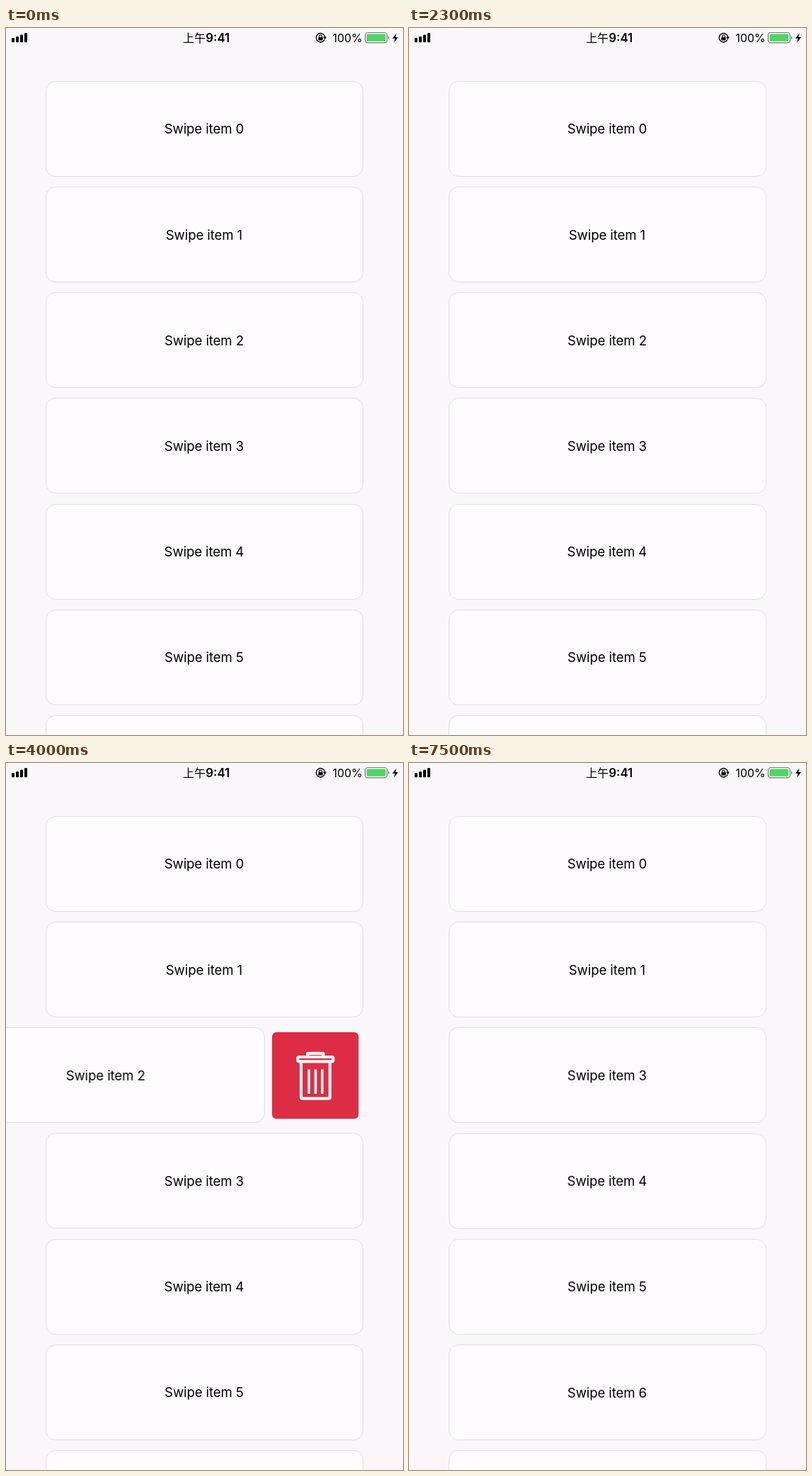
An HTML page that plays this animation: 561x998 px, repeating every 8100 ms.

```html
<!DOCTYPE html>
<html lang="en">
<head>
<meta charset="utf-8">
<title>Swipe list</title>
<style>
  html, body { margin: 0; width: 100%; height: 100%; overflow: hidden; background: #f9f7f9; }
  body { position: relative; font-family: Inter, Roboto, sans-serif; color: #000; }

  .status { position: absolute; left: 0; top: 0; }
  .cjk { font: 500 16px "Noto Sans CJK SC", "Noto Sans CJK", sans-serif; }

  .row { position: absolute; left: 56.3px; top: calc(74.8px + var(--i) * 149.2px); width: 448.6px; height: 135px; }
  .row svg { position: absolute; overflow: visible; }
  .trash { left: 319.7px; top: 6.4px; }
  .star { left: 33.7px; top: 69px; }
  .card {
    position: absolute; inset: 0; box-sizing: border-box; padding-right: 1.4px;
    border: 1.2px solid #dfdde0; border-radius: 14px; background: #fefcfe;
    font-size: 18.6px; letter-spacing: -.1px;
    display: flex; align-items: center; justify-content: center;
  }
  .bar {
    position: absolute; left: 553.8px; top: 58px; width: 3.6px; height: 593px;
    border-radius: 2px; background: rgba(0, 0, 0, .38);
  }

  .row, .card, .star, .bar { animation: 8.1s linear infinite; }
  .bar { animation-name: bar; }
  .r0 .card { animation-name: swipe0; }
  .r1 .card { animation-name: swipe1; }
  .r2 .card { animation-name: swipe2; }
  .r3 .card { animation-name: swipe3; }
  .r3 .star { animation-name: press; }
  .r2 { animation-name: remove; }
  .r2 ~ .row { animation-name: rise; }

  @keyframes swipe0 {
    0%, 11.73% { transform: none; animation-timing-function: ease-in; }
    14.81% { transform: translateX(-70px); animation-timing-function: ease-out; }
    17.28%, 18.52% { transform: translateX(-148px); animation-timing-function: ease-out; }
    20.99%, 24.69% { transform: translateX(-136.4px); animation-timing-function: ease-in-out; }
    28.4%, 100% { transform: none; }
  }
  @keyframes swipe1 {
    0%, 29.01% { transform: none; animation-timing-function: ease-in-out; }
    32.1% { transform: translateX(97px); }
    33.33% { transform: translateX(95.3px); }
    34.57% { transform: translateX(92px); animation-timing-function: ease-out; }
    36.42%, 38.27% { transform: translateX(67.3px); animation-timing-function: ease-in-out; }
    41.98%, 100% { transform: none; }
  }
  @keyframes swipe2 {
    0%, 41.98% { transform: none; animation-timing-function: ease-in; }
    44.44% { transform: translateX(-70px); animation-timing-function: ease-out; }
    46.91% { transform: translateX(-148px); animation-timing-function: ease-out; }
    49.38% { transform: translateX(-139.3px); }
    50.62%, 52.47% { transform: translateX(-136.4px); animation-timing-function: ease-in-out; }
    55.31%, 100% { transform: none; }
  }
  @keyframes swipe3 {
    0%, 63.58% { transform: none; animation-timing-function: ease-in-out; }
    67.9% { transform: translateX(88px); animation-timing-function: ease-out; }
    71.6% { transform: translateX(71px); }
    73.46%, 83.33% { transform: translateX(67.3px); animation-timing-function: ease-in-out; }
    91.98%, 100% { transform: none; }
  }
  @keyframes remove {
    0%, 53.7% { opacity: 1; }
    56.17%, 100% { opacity: 0; }
  }
  @keyframes rise {
    0%, 53.7% { transform: none; animation-timing-function: ease-in-out; }
    57.9%, 100% { transform: translateY(-149.2px); }
  }
  @keyframes press {
    0%, 74.69% { opacity: 1; }
    76.54% { opacity: .25; }
    81.48%, 100% { opacity: 1; }
  }
  @keyframes bar {
    0%, 29.38% { opacity: 0; }
    29.39%, 37.65% { opacity: 1; }
    41.36%, 100% { opacity: 0; }
  }
</style>
</head>
<body>
<svg width="0" height="0" style="position:absolute">
  <defs>
    <path id="star" d="M0-19 5.41-7.44 18.07-5.87 8.75 2.84 11.17 15.37 0 9.2-11.17 15.37-8.75 2.84-18.07-5.87-5.41-7.44Z" stroke-linejoin="round"/>
    <g id="trash">
      <rect width="122.2" height="122.2" rx="6" fill="#dc2d44"/>
      <g fill="none" stroke="#fbf3f5" stroke-width="4.2" stroke-linejoin="round">
        <path d="M50.2 34.5V29.8H72.4V34.5"/>
        <rect x="36.3" y="35" width="50" height="6.4" rx="2"/>
        <path d="M41 43V91.7a2 2 0 0 0 2 2H79.8a2 2 0 0 0 2-2V43"/>
        <path d="M52.1 52.5V87M61.5 52.5V87M70.8 52.5V87" stroke-width="3.6"/>
      </g>
    </g>
  </defs>
</svg>

<svg class="status" width="561" height="30">
  <rect x="8" y="14" width="4" height="6.3" rx="1.2"/>
  <rect x="14" y="12" width="4" height="8.3" rx="1.2"/>
  <rect x="20" y="9.5" width="4" height="10.8" rx="1.2"/>
  <rect x="26" y="7" width="4" height="13.3" rx="1.2"/>
  <text class="cjk" x="250" y="20">上午</text>
  <text x="282.3" y="20" font-size="16.8" font-weight="600">9:41</text>
  <g fill="none" stroke="#000" stroke-width="1.4">
    <path d="M450.2 16.2A6.2 6.2 0 1 1 450.6 12.6"/>
    <path d="M442.6 13.5V11.9a1.9 1.9 0 0 1 3.8 0V13.5" stroke-width="1.2"/>
  </g>
  <path d="M448 12.6H453L450.5 16.2Z"/>
  <rect x="441.3" y="13" width="6.4" height="4.6" rx=".8"/>
  <text x="461.4" y="20" font-size="16">100%</text>
  <rect x="507.5" y="6.5" width="31" height="14.4" rx="3.8" fill="none" stroke="#77777a" stroke-width="1.2"/>
  <rect x="509.6" y="8.6" width="26.8" height="10.2" rx="2" fill="#4cd663"/>
  <path d="M540 11.2a2.8 2.8 0 0 1 0 5Z" fill="#77777a"/>
  <path d="M551.6 7.6 546 14.8H549.6L548.4 20.4 554 13H550.4Z"/>
</svg>

<main id="list"></main>
<div class="bar"></div>

<script>
  const row = i => `
    <div class="row r${i}" style="--i:${i}">
      <svg class="trash" width="122" height="122"><use href="#trash"/></svg>
      <svg class="star" width="1" height="1">
        <use href="#star" stroke="#111" stroke-width="5.5"/>
        <use href="#star" fill="#f9f7f9" stroke="#f9f7f9" stroke-width="1.8"/>
      </svg>
      <div class="card">Swipe item ${i}</div>
    </div>`;
  document.getElementById('list').innerHTML = Array.from({ length: 8 }, (_, i) => row(i)).join('');
</script>
</body>
</html>
```
